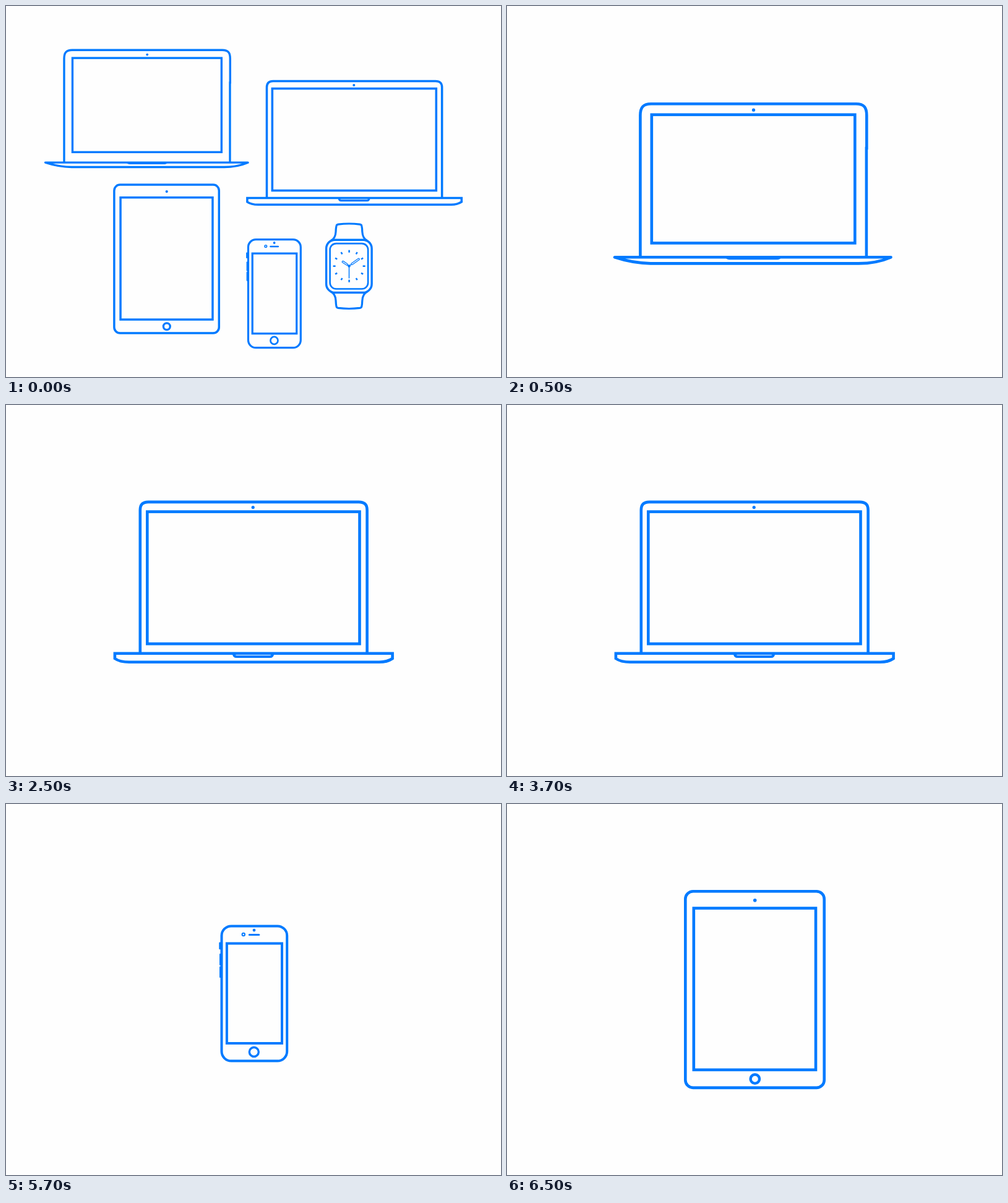
An HTML page for the animation above (8 s loop, 800 by 600 pixels).

```html
<!DOCTYPE html>
<html lang="en">
<head>
<meta charset="utf-8">
<title>Device outlines</title>
<style>
html, body { margin: 0; width: 100%; height: 100%; overflow: hidden; background: #fefefe; }
svg { display: block; width: 100vw; height: 100vh; fill: none; stroke: #007aff; stroke-width: 4.6; }
.dot { fill: #007aff; stroke: none; }
.scene { visibility: hidden; }
</style>
</head>
<body>
<svg viewBox="0 0 800 600">
  <defs>
    <g id="slim">
      <path d="M215.4 406V177C215.4 164 220 158.3 233 158.3H564C577 158.3 581.3 164 581.3 177V230H580.9V406"/>
      <rect x="233.8" y="175.8" width="328.5" height="207.6"/>
      <path stroke-linejoin="round" d="M174 406.3H620.5Q597 416.4 568 416.4H232Q202 415.6 174 406.3Z"/>
      <path class="dot" d="M352 406Q355 410.2 360 410.2H437Q441 410.2 444 406Z"/>
      <circle class="dot" cx="398.5" cy="168.2" r="2.6"/>
    </g>
    <g id="wide">
      <path d="M216.8 402V170C216.8 161 221 156.9 230 156.9H570C579.5 156.9 583.6 161 583.6 170V402"/>
      <rect x="228.3" y="172.6" width="343.2" height="213.6"/>
      <path d="M175.9 401.8H624.6V410Q616 415.8 603 415.8H199Q184 415.8 175.9 410Z"/>
      <path stroke-width="4.2" d="M368 402Q368 407 373 407H426.500Q431 407 431 402"/>
      <circle class="dot" cx="399.2" cy="165.5" r="2.6"/>
    </g>
    <g id="phone" stroke-width="4">
      <rect x="348.5" y="197.4" width="105.7" height="218.2" rx="15.5"/>
      <rect x="356.9" y="225.5" width="89.1" height="161.5"/>
      <circle cx="400.8" cy="401" r="7.5" stroke-width="3.4"/>
      <circle cx="383.8" cy="211" r="2.2" stroke-width="2"/>
      <path stroke-width="3" stroke-linecap="round" d="M393.300 211.5H408.800"/>
      <circle class="dot" cx="401" cy="204.1" r="2.4"/>
      <rect class="dot" x="344.3" y="223.5" width="4" height="11.700" rx="1.2"/>
      <rect class="dot" x="345" y="242" width="3" height="19" rx="1"/>
      <rect class="dot" x="345" y="262.500" width="3" height="18.500" rx="1"/>
    </g>
    <g id="tablet">
      <rect x="288.3" y="141.2" width="224.4" height="317.700" rx="12.500"/>
      <rect x="301.8" y="168.5" width="197.2" height="261.400"/>
      <circle cx="400.8" cy="444.7" r="7.2" stroke-width="4.4"/>
      <circle class="dot" cx="400.7" cy="155.7" r="2.8"/>
    </g>
    <g id="watch" stroke-width="3.4">
      <rect x="517.6" y="378.2" width="73.5" height="85.3" rx="14"/>
      <rect x="523.6" y="384.100" width="61.500" height="73.400" rx="10" stroke-width="2.600"/>
      <path id="strap" stroke-width="3.2" d="M525 379.500Q532.500 376 533 365Q533.200 359 534 355.500Q534.400 353.500 537 353.100Q554.400 350.900 571.800 353.100Q574.400 353.500 574.800 355.500Q575.600 359 575.800 365Q576.300 376 583.800 379.500"/>
      <use href="#strap" transform="matrix(1 0 0 -1 0 841.5)"/>
      <g id="ticks" stroke-width="2.5"></g>
      <g stroke-width="1.500">
        <path d="M554.500 420.500L570 409.500M554.500 420.500L545 414M554.500 420.500V440.500"/>
        <g stroke-linecap="round">
          <path id="hands" stroke-width="3.8" d="M559 417.200L570 409.500M551 418L544.500 413.700"/>
          <path stroke="#fefefe" stroke-width="1.3" d="M559 417.200L570 409.500M551 418L544.500 413.700"/>
        </g>
        <circle class="dot" cx="554.500" cy="420.500" r="2.300"/>
      </g>
    </g>
  </defs>
  <g class="scene">
    <use href="#slim" transform="translate(-64 -44.8) scale(.7333)"/>
    <use href="#wide" transform="translate(254.1 .3) scale(.772)"/>
    <use href="#tablet" transform="translate(-42.8 182.5) scale(.755)"/>
    <use href="#phone" transform="translate(111.8 219.2) scale(.8025)"/>
    <use href="#watch"/>
  </g>
  <use class="scene" href="#slim"/>
  <use class="scene" href="#wide"/>
  <use class="scene" href="#phone"/>
  <use class="scene" href="#tablet"/>
</svg>
<script>
const LOOP = 8000;
const ends = [500, 2500, 4500, 6500, LOOP];
const scenes = document.querySelectorAll('.scene');

document.getElementById('ticks').innerHTML = Array.from({ length: 12 }, (_, i) =>
  `<path d="M554.6 394.700v${i % 3 ? 3.6 : 4}" transform="rotate(${i * 30} 554.6 420.7)"/>`).join('');

const start = performance.now();
function draw() {
  const t = (performance.now() - start) % LOOP;
  const current = ends.findIndex(end => t < end);
  scenes.forEach((scene, i) => scene.style.visibility = i === current ? 'visible' : 'hidden');
  requestAnimationFrame(draw);
}
draw();
</script>
</body>
</html>
```
